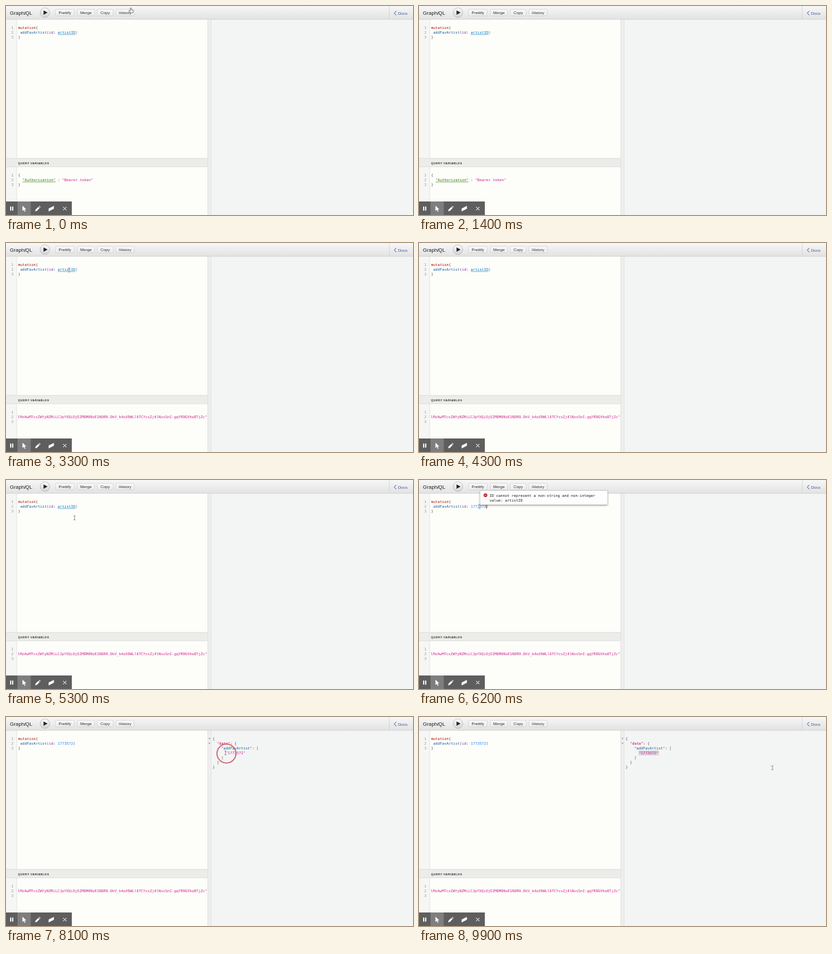
An HTML page for the animation above (10000 ms loop, 600 by 309 pixels).

```html
<!DOCTYPE html>
<html lang="en">
<head>
<meta charset="utf-8">
<title>GraphiQL mutation</title>
<style>
  html, body { margin: 0; width: 100%; height: 100%; overflow: hidden; background: #fff; }
  svg { display: block; width: 100vw; height: 100vh; }
  text { white-space: pre; font: 6px "Liberation Sans", Arial, sans-serif; fill: #333; }
  .code { font: 5.4px "DejaVu Sans Mono", monospace; fill: #555; }
  .num { fill: #999; }
  .kw { fill: #b11a04; } .prop { fill: #1f61a0; } .attr { fill: #8b2bb9; }
  .enum { fill: #0b7fc7; } .int { fill: #2882f9; } .var { fill: #397d13; }
  .str { fill: #d0268f; } .def { fill: #d2054e; }
  .sel { fill: #d7d2d8; }
  .btn { fill: url(#button); stroke: #c9c9c9; stroke-width: .6; }
  .icon { fill: #fff; }
</style>
</head>
<body>
<svg viewBox="0 0 600 309" preserveAspectRatio="none">
  <defs>
    <linearGradient id="bar" x2="0" y2="1"><stop stop-color="#f7f7f7"/><stop offset="1" stop-color="#e2e2e2"/></linearGradient>
    <linearGradient id="button" x2="0" y2="1"><stop stop-color="#f9f9f9"/><stop offset="1" stop-color="#ececec"/></linearGradient>
    <linearGradient id="round" x2="0" y2="1"><stop stop-color="#fdfdfd"/><stop offset="1" stop-color="#d2d3d6"/></linearGradient>
    <clipPath id="pane"><rect x="16.5" y="238" width="280.5" height="71"/></clipPath>
    <filter id="shadow" x="-5%" y="-20%" width="110%" height="150%"><feDropShadow dx="0" dy="1" stdDeviation="1" flood-opacity=".4"/></filter>
  </defs>

  <!-- panes -->
  <rect width="297" height="309" fill="#fdfdfa"/>
  <rect width="16" height="309" fill="#f6f6f4"/>
  <rect x="15.6" width=".6" height="309" fill="#ddd"/>
  <rect x="297" width="6" height="309" fill="#eee"/>
  <rect x="297" width=".6" height="309" fill="#dadada"/>
  <rect x="302.4" width=".6" height="309" fill="#dfdfdf"/>
  <rect x="303" width="297" height="309" fill="#f3f5f5"/>
  <rect y="225" width="297" height="13" fill="#ececea"/>
  <path d="M0 225.3H297M0 237.7H297" stroke="#d6d6d6" stroke-width=".6"/>
  <text x="17.8" y="233.5" style="font-size:4.2px;font-weight:bold;letter-spacing:.41px;fill:#333">QUERY VARIABLES</text>

  <!-- top bar -->
  <rect width="600" height="20" fill="url(#bar)"/>
  <path d="M0 19.7H600M565 0V20" stroke="#cfcfcf" stroke-width=".7"/>
  <text x="5.8" y="12.6" style="font-size:7.6px;fill:#222">Graph<tspan font-style="italic">i</tspan>QL</text>
  <circle cx="57.4" cy="9.8" r="7" fill="url(#round)" stroke="#b0b0b0" stroke-width=".7"/>
  <path d="M55.4 6.6L61.2 9.8L55.4 13Z" fill="#222"/>
  <g id="buttons"></g>
  <path d="M575.3 7.4L572.4 10.5L575.3 13.6" fill="none" stroke="#3b5998"/>
  <text x="578" y="12.6" style="fill:#3b5998">Docs</text>

  <!-- code -->
  <g id="numbers"></g>
  <rect id="idSel" class="sel" x="76.3" y="35.5" width="26" height="7"/>
  <rect id="tokenSel" class="sel" x="109" y="253.5" width="16.3" height="7"/>
  <g id="query"></g>
  <g id="queryDone"></g>
  <g id="vars"></g>
  <g id="jwt" clip-path="url(#pane)"><text class="code str" x="296.4" y="259" text-anchor="end">lMzAwMTcxZWYyNZMiLCJpYXQiOjEZMDM0NzE1NDR9.DkV_k4oX9WLl6TCYcsZj4lNxsSnI-gqYR9GVho8TjZc"</text></g>
  <path id="caret" d="M99.3 35.8V42.4" stroke="#222" stroke-width=".6"/>
  <g id="result">
    <rect id="resultSel" class="sel" x="323.6" y="49.6" width="30" height="7"/>
    <path d="M298.5 31h3l-1.5 2zM298.5 38h3l-1.5 2z" fill="#999"/>
  </g>

  <g id="tip">
    <rect x="90" y="15.5" width="188" height="21" rx="1.5" fill="#fdfdfd" stroke="#bbb" stroke-width=".5" filter="url(#shadow)"/>
    <circle cx="98" cy="22.5" r="2.7" fill="#c4151c"/>
    <path d="M97 21.5l2 2m0-2l-2 2" stroke="#fff" stroke-width=".7"/>
    <text class="code" x="104" y="25" style="fill:#222">ID cannot represent a non-string and non-integer</text>
    <text class="code" x="104" y="31.7" style="fill:#222">value: artistID</text>
  </g>

  <!-- recorder tools -->
  <rect y="289" width="97" height="20" fill="#5e5e5e"/>
  <rect x="17" y="289" width="19.5" height="20" fill="#7e7e7e"/>
  <path class="icon" d="M6 296.5h1.7v6H6zM9 296.5h1.7v6H9zM24.3 295.3v7.6l1.9-1.7 1.3 3 1.2-.5-1.3-2.9h2.5z"/>
  <path class="icon" d="M43 303.5l.6-2.4 4.2-4.2 1.8 1.8-4.2 4.2zM48.4 296.3l.8-.8 1.8 1.8-.8.8zM62.8 299.5l7.8-4v4.2l-7.8 4z"/>
  <path d="M84.2 297l5 5m0-5l-5 5" stroke="#fff"/>

  <circle id="ring" r="14" fill="none" stroke="#cd6670" stroke-width="1.6"/>
  <g id="pointer">
    <g id="beam" fill="none">
      <path d="M-1.6 -3.2Q0 -3.2 0 -2Q0 -3.2 1.6 -3.2M0 -2.4V2.4M-1.6 3.2Q0 3.2 0 2Q0 3.2 1.6 3.2" stroke="#fff" stroke-width="1.4"/>
      <path d="M-1.6 -3.2Q0 -3.2 0 -2Q0 -3.2 1.6 -3.2M0 -2.4V2.4M-1.6 3.2Q0 3.2 0 2Q0 3.2 1.6 3.2" stroke="#555" stroke-width=".6"/>
    </g>
    <path id="hand" d="M-.8 .2Q0 -.6 .8 .2V2.6L3.2 3.2Q3.8 3.6 3.6 4.6L2.9 7H-.8L-2.8 4.4Q-2.8 3.4 -1.8 3.8L-.8 4.6Z" fill="#fff" stroke="#333" stroke-width=".6"/>
  </g>
</svg>
<script>
const $ = id => document.getElementById(id);
const SVG = 'http://www.w3.org/2000/svg';
const LINE = 7.05, LOOP = 10000;

function add(parent, tag, attrs, content = '') {
  const el = document.createElementNS(SVG, tag);
  for (const key in attrs) el.setAttribute(key, attrs[key]);
  el.textContent = content;
  return $(parent).appendChild(el);
}

// Each line is plain text in which [class|words] marks a coloured run.
function code(parent, x, y, lines) {
  lines.forEach((line, i) => {
    const row = add(parent, 'text', { class: 'code', x, y: y + i * LINE });
    row.innerHTML = line.replace(/\[(\w+)\|([^\]]*)\]/g, '<tspan class="$1">$2</tspan>');
  });
}

for (const [label, x, width] of [['Prettify', 73, 27.5], ['Merge', 105, 25.5], ['Copy', 134.5, 23.5], ['History', 162, 27]]) {
  add('buttons', 'rect', { class: 'btn', x, y: 5, width, height: 9.6, rx: 1.2 });
  add('buttons', 'text', { x: x + width / 2, y: 11.8, 'text-anchor': 'middle' }, label);
}

const numbers = [1, 2, 3].map(n => `[num|${n}]`);
code('numbers', 7.7, 34, numbers);
code('numbers', 7.7, 252, numbers);

const query = arg => ['[kw|mutation]{', ` [prop|addFavArtist]([attr|id]: ${arg})`, '}'];
code('query', 17.8, 34, query('[enum|artistID]'));
code('queryDone', 17.8, 34, query('[int|1773572]'));
add('query', 'path', { d: 'M76.3 42.1H102.4', stroke: '#0b7fc7', 'stroke-width': .6 });
code('vars', 17.8, 252, ['{', '  [var|"Authorization"] : [str|"Bearer token"]', '}']);
add('vars', 'path', { d: 'M24.5 260.1H73', stroke: '#397d13', 'stroke-width': .6 });
code('result', 304.4, 34, ['{', '  [def|"data"]: {', '    [prop|"addFavArtist"]: [', '      [str|"1773572"]', '    ]', '  }', '}']);

// Pointer path: time, x, y
const path = [
  [0, 184, 3], [100, 184, 2], [500, 183, -5], [1000, 183, -12],
  [1300, 122, 320], [1900, 114, 259], [2650, 114, 259], [3200, 93, 40], [3500, 93, 40],
  [4300, 96, -12], [4700, 106, -12], [5200, 101, 56], [5300, 101, 56], [5600, 89, 39],
  [6500, 89, 39], [7000, 57, 10], [7400, 57, 10], [7900, 323.5, 53], [8500, 323.5, 53],
  [9500, 521, 75], [LOOP, 521, 75]
];
const clicks = [[1950, 114, 259], [5650, 89, 39], [7050, 57, 10], [7950, 325, 54]];
const CLICK = 300;

function pointerAt(t) {
  const i = path.findIndex(p => p[0] > t);
  const [t0, x0, y0] = path[i - 1], [t1, x1, y1] = path[i];
  const u = (t - t0) / (t1 - t0), e = u * u * (3 - 2 * u);
  return [x0 + (x1 - x0) * e, y0 + (y1 - y0) * e];
}

const between = (t, a, b) => t >= a && t < b;
const show = (id, on) => $(id).style.display = on ? '' : 'none';

function draw(t) {
  const [x, y] = pointerAt(t);
  const hand = t < 1300 || between(t, 6900, 7500);
  $('pointer').setAttribute('transform', `translate(${x} ${y})`);
  show('pointer', !between(t, 1000, 1300));
  show('hand', hand);
  show('beam', !hand);

  const click = clicks.find(c => between(t, c[0], c[0] + CLICK));
  show('ring', click);
  if (click) {
    $('ring').setAttribute('cx', click[1]);
    $('ring').setAttribute('cy', click[2]);
    $('ring').setAttribute('opacity', Math.min(1, (click[0] + CLICK - t) / 100));
  }

  show('tokenSel', between(t, 2100, 2600));
  show('vars', t < 2600);
  show('jwt', t >= 2600);
  show('idSel', between(t, 5800, 6100));
  show('query', t < 6100);
  show('queryDone', t >= 6100);
  show('caret', between(t, 6100, 6700));
  show('tip', between(t, 5600, 6600));
  $('tip').setAttribute('opacity', Math.min(1, (t - 5500) / 400, (6700 - t) / 200));
  show('result', t >= 7500);
  show('resultSel', t >= 8200);
}

function tick(now) {
  draw(Math.floor(now % LOOP / 100) * 100);
  requestAnimationFrame(tick);
}
requestAnimationFrame(tick);
</script>
</body>
</html>
```
